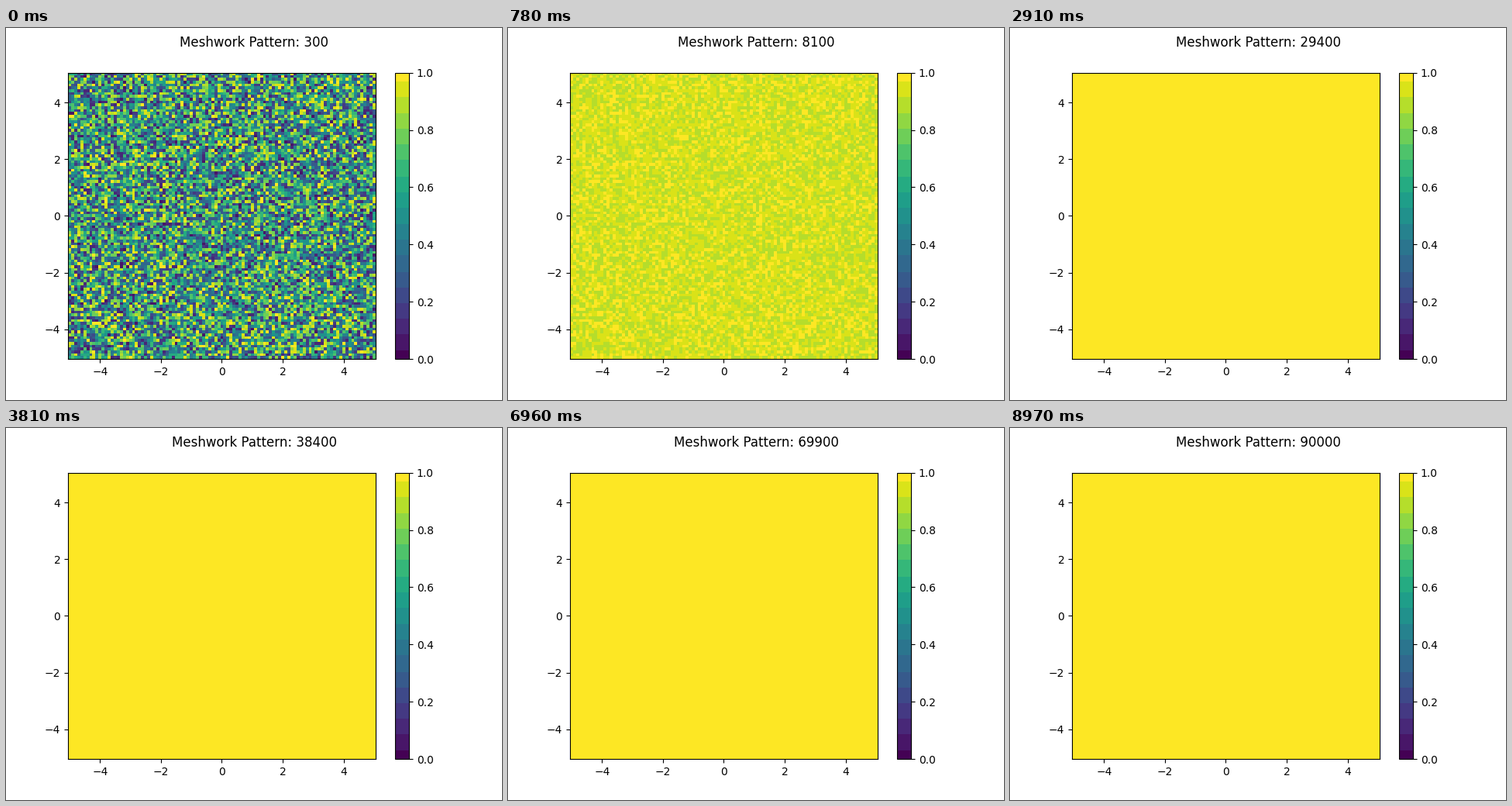
Animation, 640 px wide and 480 px high, one loop 9000 ms. Source, as a matplotlib script:

```python
import numpy as np
import matplotlib.pyplot as plt
from matplotlib.animation import FuncAnimation
from matplotlib.colors import ListedColormap

FRAMES = 300
INTERVAL = 30
STEPS_PER_FRAME = 300
GRID = 101
HALF = 5 + 5 / (GRID - 1)  # cells are centred on -5 to 5
RATE = 2.5e-4  # relaxation towards 1, per step
BANDS = 18


def banded_viridis():
    """Viridis rounded to evenly spaced flat colours."""
    levels = np.round(np.linspace(0, 1, 256) * BANDS) / BANDS
    return ListedColormap(plt.get_cmap("viridis")(levels))


start = np.random.RandomState(0).rand(GRID, GRID)


def field(step):
    return 1 - (1 - start) * np.exp(-RATE * step)


fig, ax = plt.subplots(figsize=(6.4, 4.8), dpi=100)
mesh = ax.imshow(start, cmap=banded_viridis(), vmin=0, vmax=1,
                 origin="lower", extent=(-HALF, HALF, -HALF, HALF),
                 aspect="auto", interpolation="nearest")
fig.colorbar(mesh, ax=ax)
title = fig.suptitle("")


def update(i):
    step = (i + 1) * STEPS_PER_FRAME
    mesh.set_data(field(step))
    title.set_text(f"Meshwork Pattern: {step}")
    return mesh, title


anim = FuncAnimation(fig, update, frames=FRAMES, interval=INTERVAL,
                     repeat=True, repeat_delay=0, blit=False)
plt.show()
```
